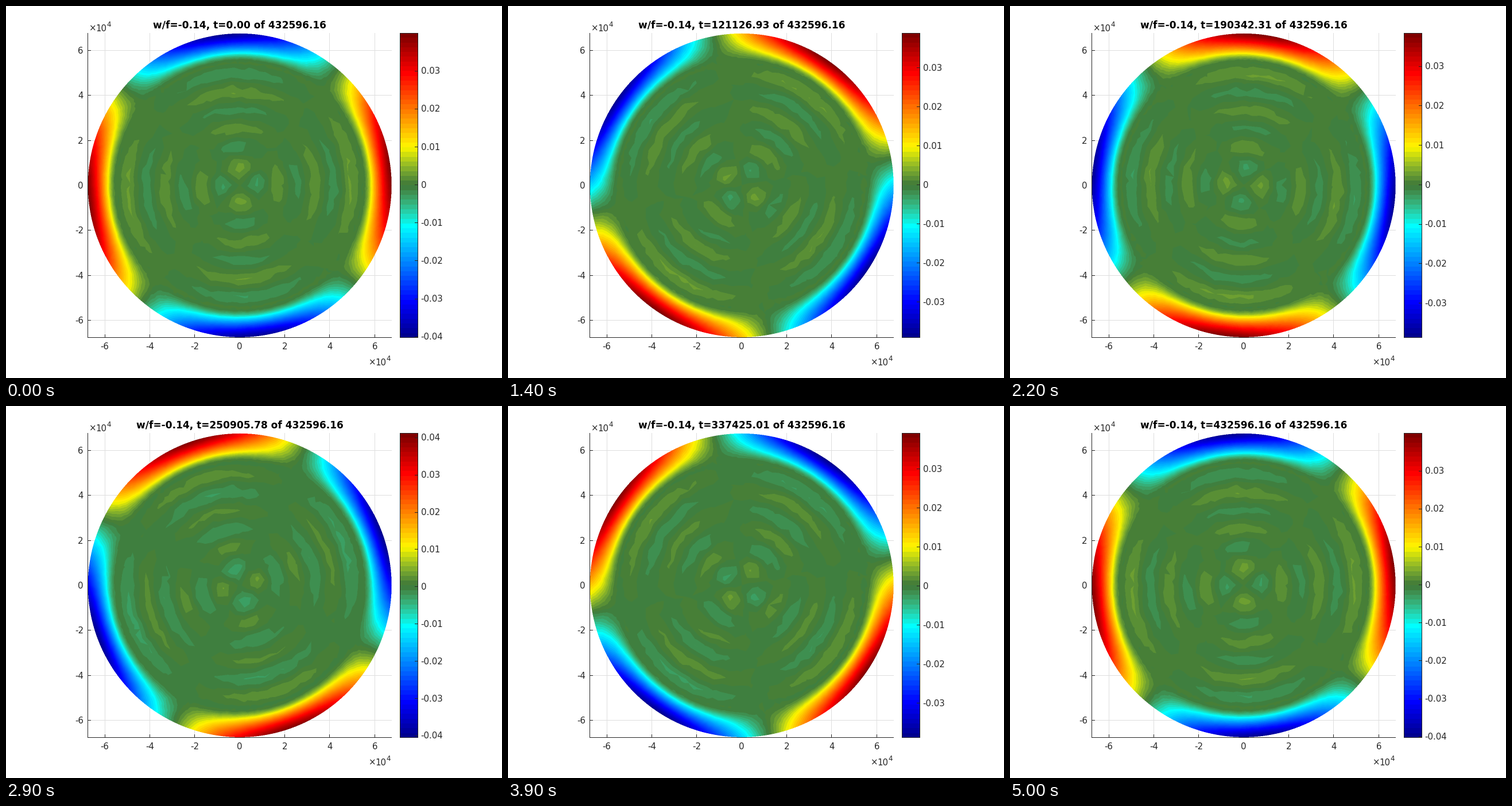
These frames come from a looping animation (864 by 648 pixels, 5.1 s). A matplotlib script:

```python
import numpy as np
import matplotlib.pyplot as plt
from matplotlib.animation import FuncAnimation
from matplotlib.tri import Triangulation, LinearTriInterpolator

W, H, DPI = 864, 648, 100
FRAMES, INTERVAL = 51, 100
T_END = 432596.1645
CX, CY, RIM = 407.2, 312.4, 264.5      # disc, in pixels
UNIT = 39.18                           # pixels per 1e4
LEFT, RIGHT, TOP, BOTTOM = 142, 672, 47, 577
BAR_X0, BAR_X1, BAR_Y0, BAR_Y1 = 686, 717, 47, 577
INK = (0.15, 0.15, 0.15)
GRID = (0.87, 0.87, 0.87)
PX = 72 / DPI                          # one pixel in points

# Upper colour limit over one cycle; the lower one is half a cycle apart.
LIMIT_STEPS = [0, 4, 6, 11, 14, 22, 25, 29, 31, 36, 39, 47, 50]
LIMIT_VALUES = [0.0399, 0.0405, 0.0412, 0.0401, 0.0388, 0.0384, 0.0402,
                0.0412, 0.0424, 0.0404, 0.0391, 0.0387, 0.0399]


def limits(step):
    def upper(s):
        return np.interp(s % 50, LIMIT_STEPS, LIMIT_VALUES)
    return -upper(step + 25), upper(step)


def colour_table():
    """Jet with 64 rows, darkened towards the middle."""
    row = np.arange(1, 65)

    def ramp(centre):
        return np.clip(1.5 - np.abs(row - centre) / 16, 0, 1)

    rgb = np.stack([ramp(48), ramp(32), ramp(16)], axis=1)
    away = np.where(row <= 32, 32 - row, row - 33)
    return rgb * np.minimum(1, 0.5 + away / 16)[:, None]


def bessel2(x):
    tau = (np.arange(240) + 0.5) * np.pi / 240
    return np.cos(2 * tau - np.outer(x, np.sin(tau))).mean(axis=1)


def radial_profile(r):
    """Rings inside plus a steep, slightly saturating layer at the rim."""
    rings = -bessel2(3.93 * r / UNIT) * (0.0066 + 0.0084 * (r / 194) ** 2.5)
    fade = np.clip((r - 203) / 22, 0, 1)
    rings *= 1 - fade * fade * (3 - 2 * fade)
    depth = 2.8 * np.logaddexp(0, (r - 221) / 2.8)
    return rings + 0.001245 * depth - 7.5e-6 * depth ** 2


def mesh_points(rng):
    """Irregular rings of nodes, finer near the rim."""
    xs, ys = [0.0], [0.0]
    r = 15.0
    while r < RIM + 8:
        size = np.interp(r, [185, 215], [17, 6])
        n = int(round(2 * np.pi * r / size))
        a = 2 * np.pi * (np.arange(n) + rng.random()) / n
        shake = size * 0.25 * (r < RIM - 8)
        xs.extend(r * np.cos(a) + rng.uniform(-shake, shake, n))
        ys.extend(r * np.sin(a) + rng.uniform(-shake, shake, n))
        r += size * 0.87
    return np.array(xs), np.array(ys)


def wave_images():
    """Cosine and sine parts of the wave at twice the pixel density."""
    rng = np.random.default_rng(4)
    x, y = mesh_points(rng)
    r, angle = np.hypot(x, y), np.arctan2(y, x)
    shift = np.radians(2 + 3 * r / RIM)
    wave = radial_profile(r) * np.exp(2j * (angle - shift))
    wave += 0.00015 * (rng.normal(size=r.size) + 1j * rng.normal(size=r.size))

    tri = Triangulation(x, y)
    finder = tri.get_trifinder()
    gx, gy = np.meshgrid(np.arange(LEFT, RIGHT, 0.5) + 0.25 - CX,
                         CY - np.arange(TOP, BOTTOM, 0.5) - 0.25)
    parts = [LinearTriInterpolator(tri, p, trifinder=finder)(gx, gy).filled(0)
             for p in (wave.real, wave.imag)]
    inside = (np.hypot(gx, gy) <= RIM).astype(float)
    return parts[0].astype(np.float32), parts[1].astype(np.float32), inside


def halve(a):
    return (a[::2, ::2] + a[1::2, ::2] + a[::2, 1::2] + a[1::2, 1::2]) / 4


TABLE = colour_table().astype(np.float32)
COS_PART, SIN_PART, INSIDE = wave_images()

plt.rcParams["font.family"] = "DejaVu Sans"
fig = plt.figure(figsize=(W / DPI, H / DPI), dpi=DPI, facecolor="white")
ax = fig.add_axes([0, 0, 1, 1])
ax.axis("off")


def h_line(x0, x1, y, color=INK, z=4):
    """Fill one pixel row from column x0 up to x1."""
    row = np.floor(y) + 0.5
    return ax.plot([x0, x1], [row, row], color=color, lw=PX, zorder=z,
                   solid_capstyle="butt", snap=False)[0]


def v_line(x, y0, y1, color=INK, z=4):
    column = np.floor(x) + 0.5
    return ax.plot([column, column], [y0, y1], color=color, lw=PX, zorder=z,
                   solid_capstyle="butt", snap=False)[0]


def label(x, y, text, size=15, ha="left", color=INK, weight="normal"):
    return ax.text(x, y, text, fontsize=size * PX, ha=ha, va="baseline",
                   color=color, weight=weight, zorder=5)


def power_label(x, y):
    label(x - 0.5, y, "×")
    label(x + 11, y, "10")
    label(x + 30.5, y - 7, "4", size=12)


# Axes, grid and tick labels
for k in range(-6, 7, 2):
    x, y = CX + UNIT * k, CY - UNIT * k
    v_line(x, TOP, BOTTOM, GRID, 1)
    h_line(LEFT, RIGHT, y, GRID, 1)
    v_line(x, BOTTOM - 5, BOTTOM, z=2)
    h_line(LEFT, LEFT + 6, y, z=2)
    label(x, 598.5, str(k), ha="center")
    label(135, y + 5.5, str(k), ha="right")
v_line(LEFT, TOP, BOTTOM + 1)
h_line(LEFT, RIGHT, BOTTOM)
power_label(145, 43.5)
power_label(632, 625.5)
title = label(CX, 39.3, "", size=17, ha="center", color="black", weight="bold")

# Disc
picture = np.ones((BOTTOM - TOP, RIGHT - LEFT, 4), dtype=np.float32)
picture[..., 3] = halve(INSIDE)
disc = ax.imshow(picture, extent=(LEFT, RIGHT, BOTTOM, TOP), aspect="auto",
                 interpolation="nearest", zorder=3)

# Colour bar
ax.imshow(TABLE[::-1, None, :], aspect="auto", interpolation="nearest",
          extent=(BAR_X0, BAR_X1 + 1, BAR_Y1 + 1, BAR_Y0), zorder=3)
for x in (BAR_X0, BAR_X1):
    v_line(x, BAR_Y0, BAR_Y1 + 1)
for y in (BAR_Y0, BAR_Y1):
    h_line(BAR_X0, BAR_X1 + 1, y)
bar_ticks = [(k / 100, h_line(BAR_X1 - 5, BAR_X1, 0),
              label(722.7, 0, f"{k / 100:g}")) for k in range(-4, 5)]

ax.set_xlim(0, W)
ax.set_ylim(H, 0)


def update(step):
    low, high = limits(step)
    phase = 2 * np.pi * step / 50
    gain = (high - low) / 0.08
    value = gain * (COS_PART * np.cos(phase) + SIN_PART * np.sin(phase))
    index = ((value - low) * (64 / (high - low))).astype(int)
    picture[..., :3] = halve(TABLE[np.clip(index, 0, 63)])
    disc.set_data(picture)

    title.set_text(f"w/f=-0.14, t={T_END * step / 50:.2f} of {T_END:.2f}")
    for v, mark, text in bar_ticks:
        y = BAR_Y1 + 0.5 - (v - low) / (high - low) * (BAR_Y1 - BAR_Y0)
        shown = low <= v <= high
        mark.set_ydata([np.floor(y) + 0.5] * 2)
        text.set_y(y + 5.2)
        mark.set_visible(shown)
        text.set_visible(shown)
    return [disc, title]


anim = FuncAnimation(fig, update, frames=FRAMES, interval=INTERVAL,
                     repeat=True, repeat_delay=0, blit=False)
plt.show()
```
